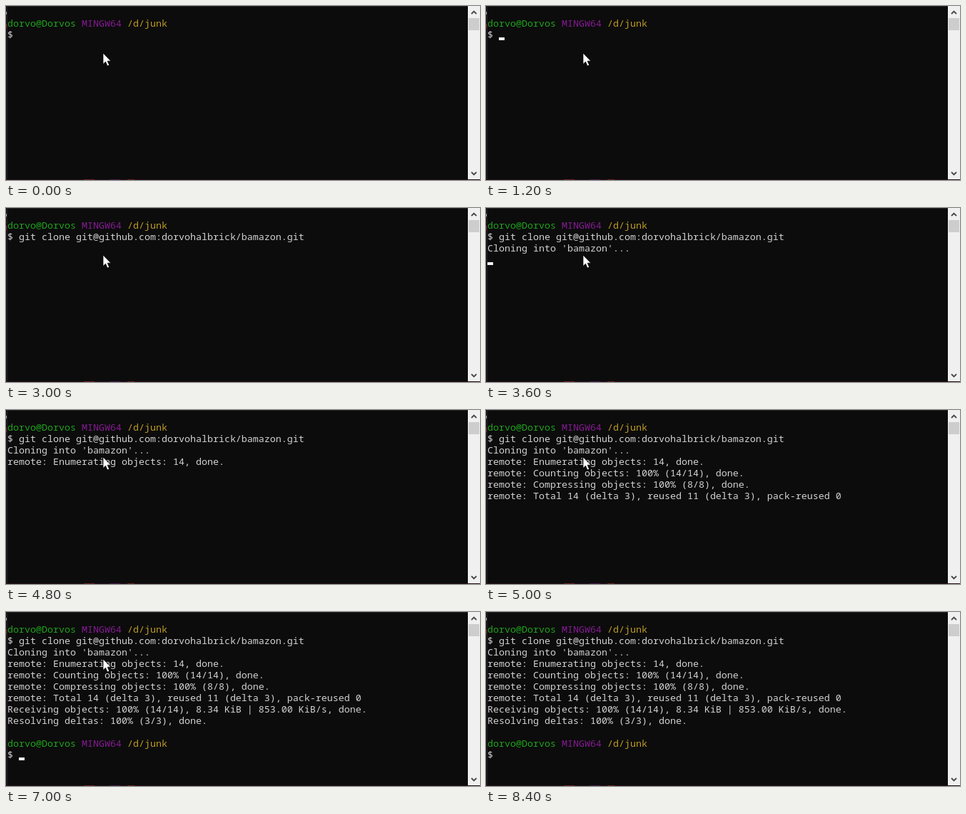
These frames come from a looping animation (664x244 px, 8.6 s). An HTML page:

```html
<!DOCTYPE html>
<html lang="en">
<head>
<meta charset="utf-8">
<title>Cloning a repository</title>
<style>
  html, body { margin: 0; width: 100%; height: 100%; overflow: hidden; background: #0c0c0c; }
  svg { display: block; }
  text {
    font: 500 13.3333px "Noto Sans Mono", "DejaVu Sans Mono", monospace;
    fill: #d2d2d2;
    white-space: pre;
  }
  .user { fill: #1fa31c; }
  .system { fill: #861a94; }
  .path { fill: #be9c22; }
</style>
</head>
<body>
<svg width="664" height="244" viewBox="0 0 664 244">
  <rect width="664" height="244" fill="#0c0c0c"/>
  <g id="edges" shape-rendering="crispEdges">
    <rect width="647" height="1" fill="#222"/>
    <rect width="1" height="244" fill="#160a14"/>
    <rect x="1" width="1" height="244" fill="#252125"/>
    <rect y="8" width="1" height="4" fill="#aaa"/>
    <rect y="25" width="1" height="6" fill="#6b2020"/>
    <rect y="243" width="664" height="1" fill="#241018"/>
    <path d="M109 243.5h15M170 243.5h10" stroke="#6b2424"/>
    <path d="M145 243.5h15" stroke="#4c1850"/>
  </g>
  <g id="screen"></g>
  <rect id="caret" width="8" height="4" fill="#f2f2f2"/>
  <g id="scrollbar">
    <rect x="647" width="17" height="243" fill="#f0f0f0"/>
    <rect x="648" y="17" width="15" height="17" fill="#cdcdcd"/>
    <path d="M652 11l3.5-3.5 3.5 3.5M652 233l3.5 3.5 3.5-3.5" fill="none" stroke="#484848" stroke-width="1.8"/>
  </g>
  <path id="pointer" d="M0 0V15.5L3.5 12.2 6 18 8.7 17 6.2 11.2H10.8Z" fill="#fff" stroke="#000" stroke-width=".7"/>
</svg>
<script>
const LOOP = 8600, STEP = 200, BLINK = 530;
const CELL = 8, ROW = 16, LEFT = 2, TOP = 16;
const TYPING = 1200, KEY_DELAY = 143, PASTE = 2800, ENTER = 3200;
const REPLY = 4800, READY = 5400, LEAVE = 7600, GONE = 8200;

const typedPart = 'git clone ';
const command = typedPart + 'git@github.com:dorvohalbrick/bamazon.git';
const output = [
  "Cloning into 'bamazon'...",
  'remote: Enumerating objects: 14, done.',
  'remote: Counting objects: 100% (14/14), done.',
  'remote: Compressing objects: 100% (8/8), done.',
  'remote: Total 14 (delta 3), reused 11 (delta 3), pack-reused 0',
  'Receiving objects: 100% (14/14), 8.34 KiB | 853.00 KiB/s, done.',
  'Resolving deltas: 100% (3/3), done.'
];
const promptRow = output.length + 3;

const byId = id => document.getElementById(id);
const show = (node, visible) => node.setAttribute('visibility', visible ? 'visible' : 'hidden');
const clamp = (value, max) => Math.max(0, Math.min(max, value));
const mix = (from, to, part) => from + (to - from) * part;

function addText(row, parts) {
  const line = document.createElementNS('http://www.w3.org/2000/svg', 'text');
  line.setAttribute('x', LEFT);
  line.setAttribute('y', TOP + row * ROW + 13);
  for (const [content, style] of parts) {
    const span = document.createElementNS(line.namespaceURI, 'tspan');
    if (style) span.setAttribute('class', style);
    span.textContent = content;
    line.append(span);
  }
  byId('screen').append(line);
  return line;
}

const addPrompt = row => addText(row, [
  ['dorvo@Dorvos ', 'user'], ['MINGW64 ', 'system'], ['/d/junk', 'path']
]);

addPrompt(0);
const input = addText(1, [['$ ']]);
const outputLines = output.map((line, i) => addText(i + 2, [[line]]));
const nextPrompt = [addPrompt(promptRow), addText(promptRow + 1, [['$']])];
const caret = byId('caret'), pointer = byId('pointer');

function typedCount(time) {
  if (time >= PASTE) return command.length;
  return clamp(Math.round((time - TYPING) / KEY_DELAY), typedPart.length);
}

function printedCount(time) {
  if (time < REPLY) return time < ENTER ? 0 : 1;
  return clamp(2 + 3 * (time - REPLY) / STEP, output.length);
}

function drawCaret(time, count, lines) {
  const ready = time >= READY;
  const row = ready ? promptRow + 1 : lines ? lines + 2 : 1;
  const column = ready ? 2 : lines ? 0 : count + 2;
  caret.setAttribute('x', LEFT + column * CELL);
  caret.setAttribute('y', TOP + row * ROW + 12);

  // The blink restarts with the new prompt.
  const lit = Math.floor((ready ? time - READY : time + 470) / BLINK) % 2 === 1;
  const busy = time >= REPLY && !ready;
  show(caret, lit && !busy && time < GONE);
}

function drawPointer(time) {
  const part = clamp((time - LEAVE) / (GONE - LEAVE), 1);
  pointer.setAttribute('transform', `translate(${mix(136, 664, part)} ${mix(66, 244, part)})`);
  show(pointer, time < GONE);
}

function draw(time) {
  const count = typedCount(time), lines = printedCount(time);
  input.firstChild.textContent = '$ ' + command.slice(0, count);
  outputLines.forEach((line, i) => show(line, i < lines));
  nextPrompt.forEach(line => show(line, time >= READY));
  drawCaret(time, count, lines);
  drawPointer(time);
}

const begin = performance.now();
function tick() {
  const time = (performance.now() - begin) % LOOP;
  draw(Math.floor(time / STEP) * STEP);
  requestAnimationFrame(tick);
}
tick();
</script>
</body>
</html>
```
